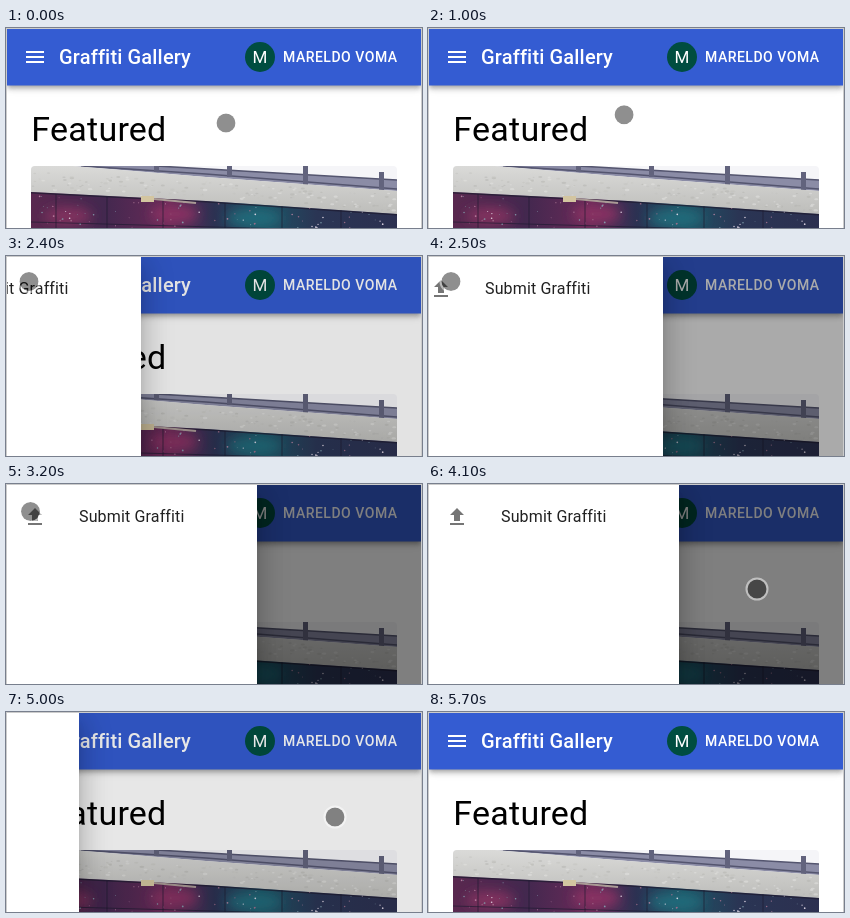
Write an HTML page that moves like this. It is 416 px wide and 200 px high and loops after 6.4 s.

```html
<!DOCTYPE html>
<html lang="en">
<head>
<meta charset="utf-8">
<title>Graffiti Gallery</title>
<style>
  html, body { margin: 0; width: 100%; height: 100%; overflow: hidden; background: #fff; }
  #stage { position: relative; width: 416px; height: 200px; overflow: hidden; background: #fff; }
  #stage > * { position: absolute; }
  svg { display: block; font-family: Roboto, sans-serif; }
  #bar {
    left: 1px; top: 0; width: 414px; height: 57px; background: #345cd2; transform: translateY(.5px);
    box-shadow: 0 2px 4px -1px rgba(0,0,0,.2), 0 4px 5px rgba(0,0,0,.14), 0 1px 10px rgba(0,0,0,.12);
  }
  #page { left: 0; top: 0; }
  #scrim { inset: 0; background: #000; }
  #drawer {
    left: 1px; top: 0; width: 250px; height: 200px; background: #fff;
    box-shadow: 0 8px 10px -5px rgba(0,0,0,.2), 0 16px 24px 2px rgba(0,0,0,.14), 0 6px 30px 5px rgba(0,0,0,.12);
  }
  #frame { inset: 0; border: 1px solid #ccc; border-bottom: 0; }
  #cursor {
    left: -12px; top: -12px; width: 19px; height: 19px; border-radius: 50%;
    border: 2px solid rgba(255,255,255,.5); background: rgba(0,0,0,.44) padding-box;
  }
</style>
</head>
<body>
<div id="stage">
  <div id="bar"></div>
  <svg id="page" width="416" height="200">
    <defs>
      <clipPath id="card"><rect x="25" y="138" width="366" height="70" rx="4"/></clipPath>
      <clipPath id="mural"><path d="M25 164l175 9 191 13v24H25z"/></clipPath>
      <filter id="soft" x="-50%" y="-50%" width="200%" height="200%"><feGaussianBlur stdDeviation="6"/></filter>
      <linearGradient id="wall">
        <stop offset="0" stop-color="#59284f"/>
        <stop offset=".2" stop-color="#43284f"/>
        <stop offset=".38" stop-color="#6a2a58"/>
        <stop offset=".5" stop-color="#2c3152"/>
        <stop offset=".63" stop-color="#1d5566"/>
        <stop offset=".78" stop-color="#2a3554"/>
        <stop offset="1" stop-color="#2c3050"/>
      </linearGradient>
      <linearGradient id="concrete" x2="0" y2="1">
        <stop offset="0" stop-color="#dadad8"/>
        <stop offset="1" stop-color="#bdbdba"/>
      </linearGradient>
    </defs>
    <g fill="#fff">
      <path transform="translate(17 17)" d="M3 18h18v-2H3zm0-5h18v-2H3zm0-7v2h18V6z"/>
      <text x="53" y="36" font-size="20" font-weight="500" letter-spacing=".15">Graffiti Gallery</text>
      <circle cx="254" cy="29" r="15" fill="#004d40"/>
      <text x="254" y="35" font-size="17" text-anchor="middle">M</text>
      <text x="277" y="34" font-size="14" font-weight="500" letter-spacing=".5">MARELDO VOMA</text>
    </g>
    <text x="25.3" y="113" font-size="34" letter-spacing=".25">Featured</text>
    <g clip-path="url(#card)">
      <path fill="#f5f5f8" d="M25 138h366v70H25z"/>
      <path fill="#8b8ca6" d="M68 138h82l241 14v11L200 149z"/>
      <path fill="none" stroke="#54556f" stroke-width="1.6" d="M75 138l125 8 191 15M150 138l241 14"/>
      <path fill="#62637d" d="M148 138h5v6h-5zM221 138h5v11h-5zM297 138h5v19h-5zM373 144h5v18h-5z"/>
      <path fill="url(#concrete)" d="M25 138h42l133 11 191 14v23l-191-13-175-9z"/>
      <g id="grain"></g>
      <g clip-path="url(#mural)">
        <path fill="url(#wall)" d="M25 160h366v50H25z"/>
        <g filter="url(#soft)">
          <ellipse cx="62" cy="188" rx="24" ry="9" fill="#82305f"/>
          <ellipse cx="168" cy="186" rx="24" ry="8" fill="#8b3264"/>
          <ellipse cx="248" cy="190" rx="28" ry="8" fill="#226c7b"/>
        </g>
        <path fill="none" stroke="#1d1b30" stroke-opacity=".65"
          d="M25 194l366 10M50 166v40M101 169v40M157 172v36M219 175v33M276 178v30M335 181v27"/>
        <path fill="none" stroke="#1d1b30" stroke-opacity=".7" stroke-width="3" d="M25 164l175 9 191 13"/>
        <g id="stars"></g>
      </g>
      <path fill="none" stroke="#aa9b96" stroke-width="2" d="M148 171l42 4"/>
      <path fill="#d3c5a0" d="M135 168h13v6h-13z"/>
    </g>
  </svg>
  <div id="scrim"></div>
  <div id="drawer">
    <svg width="250" height="200">
      <path transform="translate(16 21)" fill="#757575" d="M9 16h6v-6h4l-7-7-7 7h4zm-4 2h14v2H5z"/>
      <text x="72" y="38" font-size="16" letter-spacing=".15" fill="#212121">Submit Graffiti</text>
    </svg>
  </div>
  <div id="frame"></div>
  <div id="cursor"></div>
</div>
<script>
const LOOP = 6400, STEP = 100, DRAWER_WIDTH = 250;
const [scrim, drawer, cursor] =
  ['scrim', 'drawer', 'cursor'].map(id => document.getElementById(id));

// Pointer stops: time, x, y, easing exponent of the move that ends there.
const stops = [
  [900, 220.5, 95.5], [1300, 54, 38, 1.4], [1400, 54, 38], [1700, 23.5, 26, .7],
  [3100, 23.5, 26], [3200, 25, 28], [3400, 127.5, 81.5, 1.3], [3500, 127.5, 81.5],
  [3600, 154.5, 94.5], [3700, 154.5, 94.5], [4100, 329.5, 105.5, .9],
  [5300, 329.5, 105.5], [5600, 105.5, 23.5, 1.3]
];

const clamp = v => Math.min(1, Math.max(0, v));

// Cubic Bezier easing with control points (x1, 0) and (x2, 1).
function bezier(x1, x2, p) {
  let low = 0, high = 1;
  for (let i = 0; i < 24; i++) {
    const s = (low + high) / 2, r = 1 - s;
    if (3 * r * r * s * x1 + 3 * r * s * s * x2 + s * s * s < p) low = s;
    else high = s;
  }
  return low * low * (3 - 2 * low);
}

function pointerAt(t) {
  const next = stops.findIndex(stop => stop[0] > t);
  if (next === 0) return stops[0].slice(1);
  if (next < 0) return stops[stops.length - 1].slice(1);
  const [t0, x0, y0] = stops[next - 1];
  const [t1, x1, y1, power = 1] = stops[next];
  const p = ((t - t0) / (t1 - t0)) ** power;
  return [x0 + (x1 - x0) * p, y0 + (y1 - y0) * p];
}

let seed = 17;
const random = () => (seed = seed * 16807 % 2147483647) / 2147483647;

// Scatters ellipses over a band that slopes down to the right like the wall.
function scatter(id, { count, top, height, slope, size, stretch, colors, opacity }) {
  document.getElementById(id).innerHTML = Array.from({ length: count }, (_, i) => {
    const dx = random() * 362, r = size * (.4 + random() * .6);
    const y = top + dx * slope + random() * height;
    return `<ellipse cx="${27 + dx}" cy="${y}" rx="${r * stretch}" ry="${r}"
      fill="${colors[i % colors.length]}" opacity="${opacity}"/>`;
  }).join('');
}

function draw(now) {
  const t = Math.floor(now % LOOP / STEP) * STEP;
  const opening = clamp((t - 2350) / 225);
  const closing = clamp((t - 4838) / 200);
  const shown = bezier(0, .2, opening) - bezier(.4, 1, closing);
  drawer.style.visibility = opening > 0 && closing < 1 ? 'visible' : 'hidden';
  drawer.style.transform = `translateX(${Math.round((shown - 1) * DRAWER_WIDTH)}px)`;
  scrim.style.opacity = (opening - closing) * .5;

  const [x, y] = pointerAt(t);
  cursor.style.transform = `translate(${x}px, ${y}px)`;
  cursor.style.visibility = t < 5700 ? 'visible' : 'hidden';
  requestAnimationFrame(draw);
}

scatter('grain', {
  count: 160, top: 143, height: 18, slope: .062, size: 1.2, stretch: 2,
  colors: ['#b4b4b0', '#e6e6e4', '#c3c3c0'], opacity: .5
});
scatter('stars', {
  count: 110, top: 168, height: 32, slope: .04, size: .9, stretch: 1,
  colors: ['#f0e6f2', '#c08aa8', '#86a9b5', '#a5708e'], opacity: .85
});
draw(0);
</script>
</body>
</html>
```
